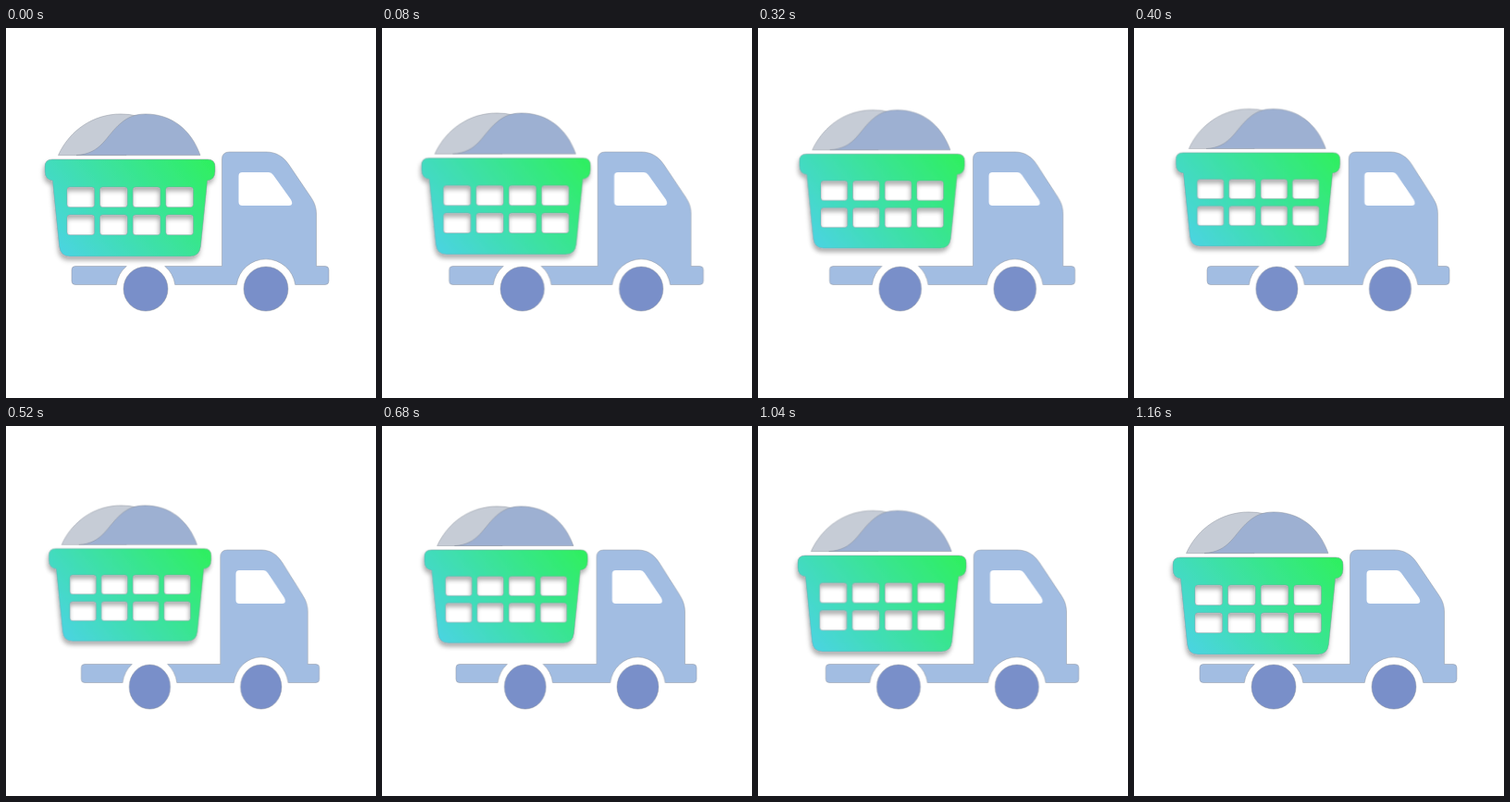
Write an HTML page that moves like this. It is 400 px wide and 400 px high and loops after 1.2 s.

```html
<!DOCTYPE html>
<html lang="en">
<head>
<meta charset="utf-8">
<title>Delivery truck</title>
<style>
  html, body { margin: 0; width: 100%; height: 100%; overflow: hidden; background: #fff; }
  svg { display: block; width: 100vw; height: 100vh; }
  #truck, #load { transform-box: view-box; }
  #truck { transform-origin: 210px 210px; }
  #load { transform-origin: 134px 170px; }
  .line { stroke: #8c929c; stroke-width: .6; stroke-opacity: .8; }
</style>
</head>
<body>
<svg viewBox="0 0 400 400">
  <defs>
    <linearGradient id="mint" gradientUnits="userSpaceOnUse" x1="65" y1="253" x2="209" y2="134">
      <stop offset="0" stop-color="#4ad4e2"/>
      <stop offset="1" stop-color="#2fef62"/>
    </linearGradient>
    <filter id="shade" filterUnits="userSpaceOnUse" x="20" y="120" width="230" height="160">
      <feDropShadow dx="-1" dy="4" stdDeviation="2.4" flood-color="#000" flood-opacity=".32"/>
    </filter>
  </defs>

  <g id="truck" class="line">
    <g fill="#a2bde2">
      <path d="M75 257.5H130.3A32 32 0 0 0 119.3 277.5H75Q71 277.5 71 273.5V261.5Q71 257.5 75 257.5Z"/>
      <path d="M171.7 257.5H233.5V142Q233.5 134 241.5 134H281C292 134 300 139 306 148L329 182C333.5 188.500 335.500 194 335.500 201V257.500H345Q349 257.500 349 261.500V273.500Q349 277.500 345 277.500H312.700A32 32 0 0 0 249.300 277.500H182.700A32 32 0 0 0 171.700 257.500Z"/>
    </g>
    <path fill="#fff" stroke="none" d="M255.500 156H284Q287 156 289 159L308 185.500Q311.500 192 306 192H255.500Q251.500 192 251.500 188V160Q251.500 156 255.500 156Z"/>
    <g fill="#798fc9">
      <circle cx="151" cy="282" r="24"/>
      <circle cx="281" cy="282" r="24"/>
    </g>
  </g>

  <g id="load" class="line">
    <path fill="#c6ccd6" d="M56.500 137.500C69 110 95 93 124 93Q134 93 141 95L130 137.500Z"/>
    <path fill="#9db0d2" d="M76 137.500C104 136 108 116 124 103C132 96 140 93 151 93C178 93 200 109 210 137.500Z"/>
    <path id="basket" fill="url(#mint)" fill-rule="evenodd" filter="url(#shade)"/>
  </g>
</svg>
<script>
  const $ = id => document.getElementById(id);

  const slot = (x, y, w = 29.6, h = 21.7, r = 3) =>
    `M${x + r} ${y}h${w - 2 * r}q${r} 0 ${r} ${r}v${h - 2 * r}q0 ${r} ${-r} ${r}` +
    `h${2 * r - w}q${-r} 0 ${-r} ${-r}v${2 * r - h}q0 ${-r} ${r} ${-r}z`;

  let shape = 'M50 142H218Q226 142 226 150V155Q226 164 217.700 165' +
    'L210.500 236Q209.200 247 199 247H69Q58.800 247 57.500 236' +
    'L50.300 165Q42 164 42 155V150Q42 142 50 142Z';
  for (const y of [172, 202])
    for (let i = 0; i < 4; i++) shape += slot(66 + i * 35.6, y);
  $('basket').setAttribute('d', shape);

  // Out in 14 steps, back in 15, then one step at rest.
  const pulse = (id, rest, peak) => $(id).animate([
    { offset: 0, transform: rest, easing: 'steps(14, end)' },
    { offset: 560 / 1200, transform: peak, easing: 'steps(15, end)' },
    { offset: 1160 / 1200, transform: rest },
    { offset: 1, transform: rest }
  ], { duration: 1200, iterations: Infinity });

  pulse('truck', 'scaleX(1)', 'scaleX(.92)');
  pulse('load', 'translateY(0px) scale(1)', 'translateY(-11.6px) scale(.95)');
</script>
</body>
</html>
```
